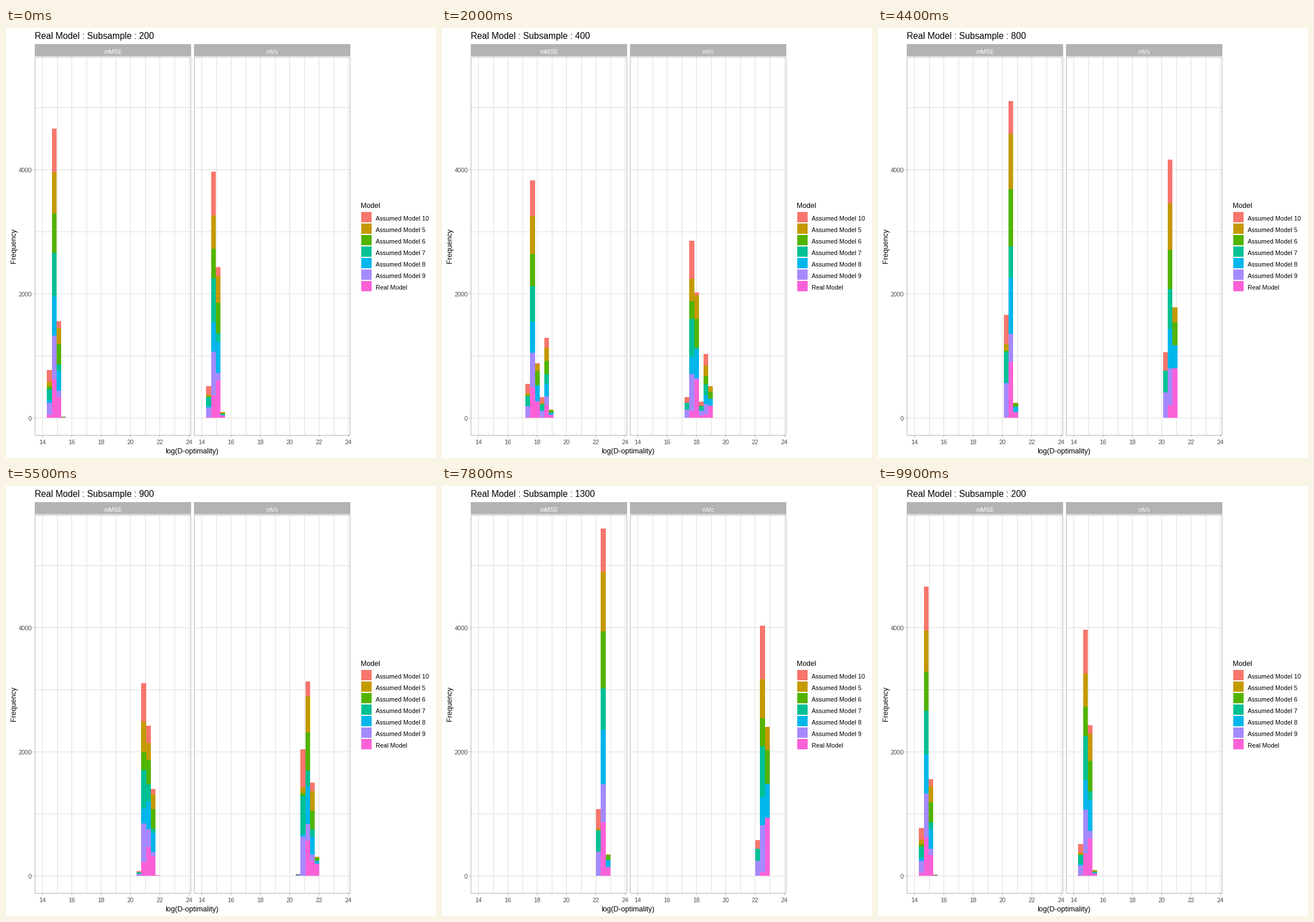
Recreate the animation shown at these times as a matplotlib script. Size 748 px wide and 748 px high, loop 10 s.

```python
import math

import matplotlib.pyplot as plt
import numpy as np
from matplotlib.animation import FuncAnimation
from matplotlib.collections import PolyCollection
from matplotlib.patches import Rectangle

SIZE, DPI = 748, 64
GREY, GRID, TICK = "#B3B3B3", "#DEDEDE", "#4D4D4D"
MODELS = {
    "Assumed Model 10": "#F8766D",
    "Assumed Model 5": "#C49A00",
    "Assumed Model 6": "#53B400",
    "Assumed Model 7": "#00C094",
    "Assumed Model 8": "#00B6EB",
    "Assumed Model 9": "#A58AFF",
    "Real Model": "#FB61D7",
}
COLORS = list(MODELS.values())
SIZES = list(range(200, 1600, 100))
PANELS = {"mMSE": 50, "mVc": 327}
ZERO, PER_UNIT = 678, 0.108
BINS = 30

# First frame and number of steps of each change of state
CHANGES = [(4, 4), (12, 4), (20, 4), (28, 3), (35, 3), (42, 3), (49, 2)]
CHANGES += [(55 + 7 * k, 3) for k in range(7)]

# Mean of each model in bin units, at the smallest and at large subsamples
NEAR = np.array([[0, .29, .38, .02, .37, -.01, .39],
                 [.09, .52, .60, .08, .61, .05, .75]])
FAR = np.array([[0, .35, .57, -.02, .63, -.05, .65],
                [.135, .83, .93, .09, .935, .05, 1.28]])

erf = np.vectorize(math.erf)


def counts(n):
    """Histogram counts as panel x model x bin, 1000 runs per model."""
    r = 200 / n
    base = 20.02 + 12.55 * math.log(n / 800) - .21 * r ** 3
    mean = base + FAR + (NEAR - FAR) * r ** 1.5
    sd = .47 * r ** .38
    z = (np.arange(BINS + 1) - mean[:, :, None]) / sd
    return np.diff(np.round(500 * (1 + erf(z / math.sqrt(2)))), axis=2)


STATES = [counts(n) for n in SIZES]

fig = plt.figure(figsize=(SIZE / DPI, SIZE / DPI), dpi=DPI, facecolor="white")
ax = fig.add_axes([0, 0, 1, 1])
ax.set_xlim(0, SIZE)
ax.set_ylim(SIZE, 0)
ax.axis("off")


def box(x, y, w, h, color, z=1):
    ax.add_patch(Rectangle((x, y), w, h, fc=color, lw=0,
                           antialiased=False, zorder=z))


def label(x, y, text, px, color="black", ha="left", **kw):
    return ax.text(x, y, text, fontsize=px * 72 / DPI, color=color, ha=ha,
                   va="baseline", family="Liberation Sans", zorder=5, **kw)


def draw_panel(name, x0):
    box(x0, 28, 272, 21, GREY)
    label(x0 + 136, 44.5, name, 10.6, "white", "center")
    for v in range(0, 6000, 1000):
        box(x0, round(ZERO - v * PER_UNIT), 272, 1, GRID)
    for v in range(14, 25):
        x = round(x0 + 13.3 + 25.48 * (v - 14))
        box(x, 50, 1, 659, GRID)
        if v % 2 == 0:
            box(x, 709, 1, 3, GREY)
            label(x + .5, 724, str(v), 10.8, TICK, "center")
    for x in (x0, x0 + 271):
        box(x, 50, 1, 659, GREY, 4)
    for y in (50, 708):
        box(x0, y, 272, 1, GREY, 4)


def draw_legend():
    label(617, 313, "Model", 12.4)
    for i, (name, color) in enumerate(MODELS.items()):
        box(618, 320 + 20 * i, 18, 18, color)
        label(643, 334.5 + 20 * i, name, 10.8)


for name, x0 in PANELS.items():
    draw_panel(name, x0)
for v in (0, 2000, 4000):
    y = round(ZERO - v * PER_UNIT)
    box(47, y, 3, 1, GREY)
    label(45, y + 4.7, str(v), 10.8, TICK, "right")
label(323, 740, "log(D-optimality)", 12.65, ha="center")
label(17.5, 379, "Frequency", 12.7, ha="center", rotation=90,
      rotation_mode="anchor")
draw_legend()
title = label(50, 19, "", 15.5)

bars = PolyCollection([], antialiaseds=False, linewidths=0, zorder=3)
ax.add_collection(bars, autolim=False)


def blend_at(frame):
    """Indices of the two states and the share of the second."""
    now = (0, 0, 0.0)
    for i, (start, steps) in enumerate(CHANGES):
        if frame >= start:
            share = min(1.0, (frame - start + 1) / steps)
            now = (i, (i + 1) % len(SIZES), share)
    return now


def update(frame):
    a, b, t = blend_at(frame)
    data = (1 - t) * STATES[a] + t * STATES[b]
    verts, fills = [], []
    for stack, x0 in zip(data, PANELS.values()):
        edges = np.round(x0 + 13.15 + 8.2 * np.arange(BINS + 1))
        tops = np.cumsum(stack[::-1], axis=0)[::-1]
        upper = np.round(ZERO - PER_UNIT * tops)
        lower = np.vstack([upper[1:], np.full(BINS, ZERO)])
        for m, k in np.argwhere(lower > upper):
            l, r, y0, y1 = edges[k], edges[k + 1], upper[m, k], lower[m, k]
            verts.append([(l, y0), (r, y0), (r, y1), (l, y1)])
            fills.append(COLORS[m])
    bars.set_verts(verts)
    bars.set_facecolor(fills)
    title.set_text(f"Real Model : Subsample : {SIZES[b if t > .5 else a]}")
    return bars, title


anim = FuncAnimation(fig, update, frames=100, interval=100, repeat=True,
                     repeat_delay=0, init_func=lambda: update(0))
plt.show()
```
